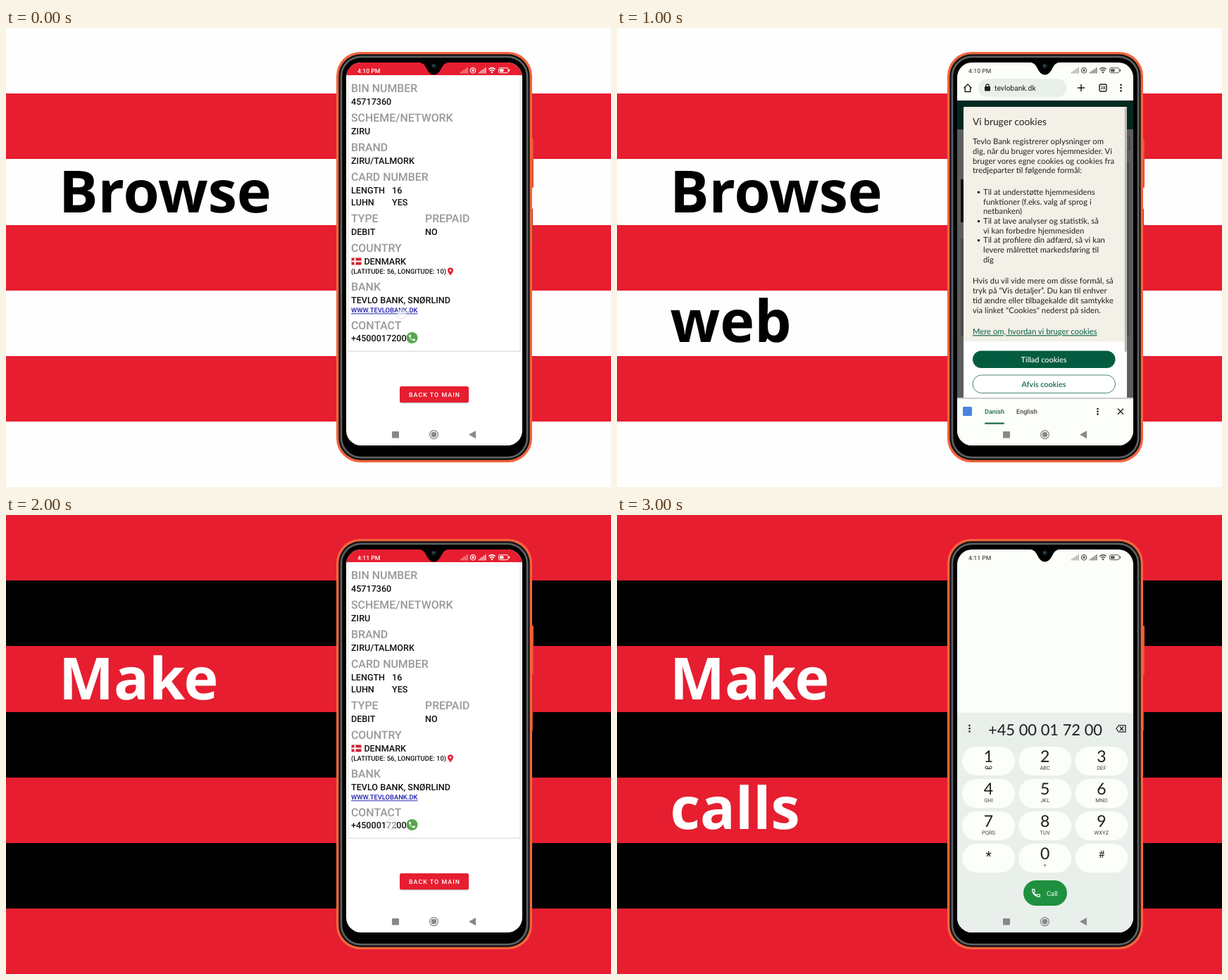
These frames come from a looping animation (859 px wide and 652 px high, 4000 ms). An HTML page:

```html
<!DOCTYPE html>
<html lang="en">
<head>
<meta charset="utf-8">
<title>Card lookup demo</title>
<style>
  html, body { margin: 0; width: 100%; height: 100%; overflow: hidden; background: #fff; }
  svg { display: block; width: 100vw; height: 100vh; text-rendering: geometricPrecision; }
  text { font-family: Roboto, sans-serif; white-space: pre; }
  .title { font: 700 82.7px "Open Sans", sans-serif; }
  .lato { font-family: Lato, sans-serif; }
  .mid { text-anchor: middle; }
  .med { font-weight: 500; }
</style>
</head>
<body>
<svg id="stage" viewBox="0 0 859 652"></svg>
<script>
const RED = '#e61e30', GREEN = '#045c40', INK = '#1d1d1d', CREAM = '#f3f0e8', PALE = '#fcfef9';

const rect = (x, y, w, h, fill, r = 0, extra = '') =>
  `<rect x="${x}" y="${y}" width="${w}" height="${h}" fill="${fill}" rx="${r}" ${extra}/>`;
const dot = (x, y, r, fill, extra = '') =>
  `<circle cx="${x}" cy="${y}" r="${r}" fill="${fill}" ${extra}/>`;
const line = (d, stroke, w = 1, extra = '') =>
  `<path d="${d}" fill="none" stroke="${stroke}" stroke-width="${w}" ${extra}/>`;
const shape = (d, fill, extra = '') => `<path d="${d}" fill="${fill}" ${extra}/>`;
const text = (s, x, y, size, fill, cls = 'med', extra = '') =>
  `<text x="${x}" y="${y}" font-size="${size}" fill="${fill}" class="${cls}" ${extra}>${s}</text>`;
const dots = (x, y, gap = 4.2) => [-gap, 0, gap].map(d => dot(x, y + d, 1.3, INK)).join('');

const HANDSET = 'M6.6 10.8c1.4 2.8 3.8 5.1 6.6 6.6l2.2-2.2c.3-.3.7-.4 1-.2 1.1.4 2.3.6 3.6.6.5 0 1 .4 1 1V20' +
  'c0 .6-.5 1-1 1C10.6 21 3 13.4 3 4c0-.6.5-1 1-1h3.5c.6 0 1 .4 1 1 0 1.2.2 2.4.6 3.6.1.3 0 .7-.3 1z';
const handset = (x, y, scale, paint) =>
  `<g transform="translate(${x} ${y}) scale(${scale}) translate(-12 -12)"><path d="${HANDSET}" ${paint}/></g>`;

function stripes(a, b) {
  const edge = i => Math.round(i * 93.2);
  let s = rect(0, 0, 859, 652, a);
  for (let i = 1; i < 7; i += 2) s += rect(0, edge(i), 859, edge(i + 1) - edge(i), b);
  return s;
}

function statusBar(time, color) {
  const bars = (x, o) => [0, 1, 2, 3, 4].map(i =>
    rect(x + i * 2.3, 62.5 - i * 1.6, 1.4, 2 + i * 1.6, color, 0, `opacity="${o}"`)).join('');
  return text(time, 499, 63.5, 8.7, color) + bars(645, .55) + bars(671, .85) +
    dot(663, 60.3, 3.7, 'none', `stroke="${color}" stroke-width="1.2"`) + rect(661.5, 58.8, 3, 3, color, .6) +
    line('M685.3 58.7Q690 54.5 694.7 58.7M687 61Q690 58.3 693 61', color, 1.5) + dot(690, 63, 1.3, color) +
    rect(699.5, 56.7, 13.5, 7, 'none', 2, `stroke="${color}"`) +
    rect(701, 58.2, 5.5, 4, color, .6) + rect(713.7, 58.7, 1.5, 3, color, .6);
}

const navBar = rect(548, 573, 10, 9.5, '#888', 1) +
  dot(607.5, 577.6, 5.9, 'none', 'stroke="#888" stroke-width="1.3"') + dot(607.5, 577.6, 3.8, '#888') +
  shape('M657 577.6L667 572V583.2Z', '#888');

function phone(screen) {
  return rect(745, 157, 4, 70, '#e4532f', 1.5) + rect(744, 256, 4, 51, '#b23a20', 1.5) +
    rect(469, 34, 278, 583, '#f4643c', 34) +
    rect(472.3, 37.3, 271.4, 576.4, '#161616', 31) +
    rect(476, 41, 264, 569, '#000', 28, 'stroke="#5f6162" stroke-width="2.6"') +
    `<clipPath id="glass">${rect(483, 49, 250, 544, '#fff', 21)}</clipPath><g clip-path="url(#glass)">${screen}${navBar}</g>` +
    shape('M583 48C592 49 594 52 597 57.500Q601 66.500 607.500 66.500Q614 66.500 618 57.500C621 52 623 49 632 48Z', '#000') +
    dot(607.5, 54, 3.8, '#10191d') + dot(607, 53.5, 1.4, '#31606a');
}

function cardInfo(time, tapX, tapY, tapR) {
  const head = (s, y, x = 490) => text(s, x, y, 15.9, '#999');
  const val = (s, y, x = 490) => text(s, x, y, 12.6, '#111');
  return rect(483, 49, 250, 544, '#fff') +
    rect(485.5, 60, 245, 400, '#e2e2e2', 2) + rect(486.5, 60, 243, 398.5, '#fff', 2) +
    rect(483, 49, 250, 18, RED) + statusBar(time, '#fff') +
    head('BIN NUMBER', 91.3) + val('45717360', 109.4) +
    head('SCHEME/NETWORK', 133.3) + val('ZIRU', 151.3) +
    head('BRAND', 175) + val('ZIRU/TALMORK', 193) +
    head('CARD NUMBER', 217) + val('LENGTH', 235) + val('16', 235, 548) +
    val('LUHN', 252.3) + val('YES', 252.3, 548) +
    head('TYPE', 276) + val('DEBIT', 293.8) + head('PREPAID', 276, 595) + val('NO', 293.8, 595) +
    head('COUNTRY', 318) + rect(490.5, 326.5, 14, 10, '#d2202f', 1) +
    line('M490.5 331.5H504.5M495.5 326.5V336.5', '#fff', 2) + val('DENMARK', 335.8, 508.4) +
    text('(LATITUDE: 56, LONGITUDE: 10)', 490, 349.4, 9.45, '#111') +
    shape('M631 351.5C629 348 627 346.5 627 344.5A4 4 0 0 1 635 344.5C635 346.5 633 348 631 351.5Z', RED) +
    dot(631, 344.4, 1.4, '#fff') +
    head('BANK', 373) + val('TEVLO BANK, SNØRLIND', 390.6) +
    text('WWW.TEVLOBANK.DK', 490, 404.4, 9.4, '#1a1aa8', 'med', 'text-decoration="underline"') +
    head('CONTACT', 427.6) + val('+4500017200', 445.3) +
    dot(576.5, 440, 8, '#5aa650') + handset(576.5, 440, .48, 'fill="#fff"') +
    rect(559, 510, 98, 23.5, '#ccc', 2.5) + rect(559, 509, 98, 23, RED, 2.5) +
    text('BACK TO MAIN', 572, 524, 8.8, '#fff', 'med', 'letter-spacing="1.05"') +
    dot(tapX, tapY, tapR, '#fff', 'fill-opacity=".55" stroke="#aaa" stroke-opacity=".6" stroke-width=".8"');
}

function webPage() {
  const para = (lines, x, y) => lines.map((s, i) => text(s, x, y + i * 13.75, 11.3, '#222', 'lato')).join('');
  const bullet = (lines, y) => dot(513.5, y - 3.5, 1.8, '#222') + para(lines, 520, y);
  return rect(483, 49, 250, 544, PALE) + statusBar('4:10 PM', '#555') +
    line('M492.5 85.5L498 80L503.5 85.5M494.3 84V90.5H501.7V84', INK, 1.4) +
    rect(513, 72, 125.5, 26, '#e9f0e9', 13) +
    rect(522, 83, 8, 6.5, INK, 1) + line('M523.8 83.5V82A2.2 2.2 0 0 1 528.2 82V83.5', INK, 1.2) +
    text('tevlobank.dk', 536, 88.7, 10.4, INK, '') +
    line('M654 85H664M659 80V90', INK, 1.5) +
    rect(685, 80, 10, 10, 'none', 2, `stroke="${INK}" stroke-width="1.4"`) + text('28', 690, 87.4, 6.2, INK, 'mid med') +
    dots(715.5, 85) +
    rect(483, 103, 250, 41, '#03291f') + rect(483, 144, 250, 383, '#5d5d5d') +
    rect(488, 215, 6, 61, '#101010') + rect(488, 300, 6, 137, '#4a4a4a') +
    rect(722, 190, 5, 247, '#4a4a4a') + rect(723, 154, 4.5, 19, 'none', 1, 'stroke="#333"') +
    rect(492, 112, 232, 415, '#fff', 1.5) + rect(492, 112, 232, 333.5, CREAM, 1.5) +
    rect(720.8, 113, 3, 347, '#b5b5b2', 1.5) +
    text('Vi bruger cookies', 505, 138, 13.8, '#222', 'lato') +
    para(['Tevlo Bank registrerer oplysninger om', 'dig, når du bruger vores hjemmesider. Vi',
      'bruger vores egne cookies og cookies fra', 'tredjeparter til følgende formål:'], 505, 165) +
    bullet(['Til at understøtte hjemmesidens', 'funktioner (f.eks. valg af sprog i', 'netbanken)'], 236.8) +
    bullet(['Til at lave analyser og statistik, så', 'vi kan forbedre hjemmesiden'], 278) +
    bullet(['Til at profilere din adfærd, så vi kan', 'levere målrettet markedsføring til', 'dig'], 305.3) +
    para(['Hvis du vil vide mere om disse formål, så', 'tryk på “Vis detaljer”. Du kan til enhver',
      'tid ændre eller tilbagekalde dit samtykke', 'via linket "Cookies" nederst på siden.'], 505, 363.4) +
    text('Mere om, hvordan vi bruger cookies', 505, 435.3, 11.25, GREEN, 'lato', 'text-decoration="underline"') +
    rect(505, 458.5, 202.5, 24.5, GREEN, 12.2) + text('Tillad cookies', 606, 474.5, 10.9, '#fff', 'lato mid med') +
    rect(505, 493, 202.5, 25.5, '#fff', 12.7, 'stroke="#4b8571"') +
    text('Afvis cookies', 606, 509.6, 10.9, GREEN, 'lato mid med') +
    rect(483, 525, 250, 2, '#ccc') + rect(483, 527, 250, 66, PALE) +
    rect(491, 538, 13, 13, '#4a83dd', 1.5) +
    text('Danish', 522, 548.3, 9.1, '#1b6b4f') + text('English', 567, 548.3, 9.1, '#444') +
    rect(522, 560.5, 28, 2.2, '#1b6b4f', 1) + dots(682.5, 544.8, 3.8) +
    line('M711 540.8L719 548.8M719 540.8L711 548.8', INK, 1.4);
}

function dialer() {
  const letters = ['', 'ABC', 'DEF', 'GHI', 'JKL', 'MNO', 'PQRS', 'TUV', 'WXYZ', '', '+', ''];
  const keys = [...'123456789*0#'].map((key, i) => {
    const x = 527.5 + i % 3 * 80.2, y = 329 + Math.floor(i / 3) * 46;
    const digit = key >= '0' && key <= '9';
    const label = digit ? text(key, x, y + 22.4, 23, INK, 'lato mid')
      : text(key, x, y + (key == '*' ? 24 : 20), key == '*' ? 19 : 14.5, INK, 'mid');
    return rect(x - 37.5, y, 75, 41, PALE, 20.5) + label + text(letters[i], x, y + 32.6, 7.6, '#444', 'mid');
  }).join('');
  const mail = dot(524.7, 358.8, 1.8, 'none', 'stroke="#333"') + dot(530.3, 358.8, 1.8, 'none', 'stroke="#333"') +
    line('M524.7 360.6H530.3', '#333');
  return rect(483, 49, 250, 544, PALE) + statusBar('4:11 PM', '#555') +
    rect(483, 280.5, 250, 2, '#f1f4ef') + rect(483, 282, 250, 311, '#e9efea') +
    dots(500.5, 303.3) + text('+45 00 01 72 00', 608, 312.5, 21.9, INK, 'lato mid') +
    line('M708.8 303.5L712.5 298.8H722V308.2H712.5ZM714 301L719 306M719 301L714 306', INK, 1.2) +
    keys + mail + rect(577, 519, 62, 36, '#1e903f', 18) +
    handset(595, 537, .6, 'fill="none" stroke="#fff" stroke-width="2"') + text('Call', 610, 540.8, 9.4, '#fff', '');
}

const words = (color, first, second = '') =>
  `<g fill="${color}"><text class="title" x="75" y="262">${first}</text>` +
  `<text class="title" x="75.5" y="446">${second}</text></g>`;
const light = stripes('#fefefe', RED), dark = stripes(RED, '#000');

const scenes = [
  light + words('#000', 'Browse') + phone(cardInfo('4:10 PM', 562, 406, 7)),
  light + words('#000', 'Browse', 'web') + phone(webPage()),
  dark + words('#fff', 'Make') + phone(cardInfo('4:11 PM', 547, 439, 7.5)),
  dark + words('#fff', 'Make', 'calls') + phone(dialer())
];

const stage = document.getElementById('stage');
let shown = -1;
function draw(now) {
  const i = Math.floor(now / 1000) % scenes.length;
  if (i !== shown) stage.innerHTML = scenes[shown = i];
  requestAnimationFrame(draw);
}
draw(performance.now());
</script>
</body>
</html>
```
